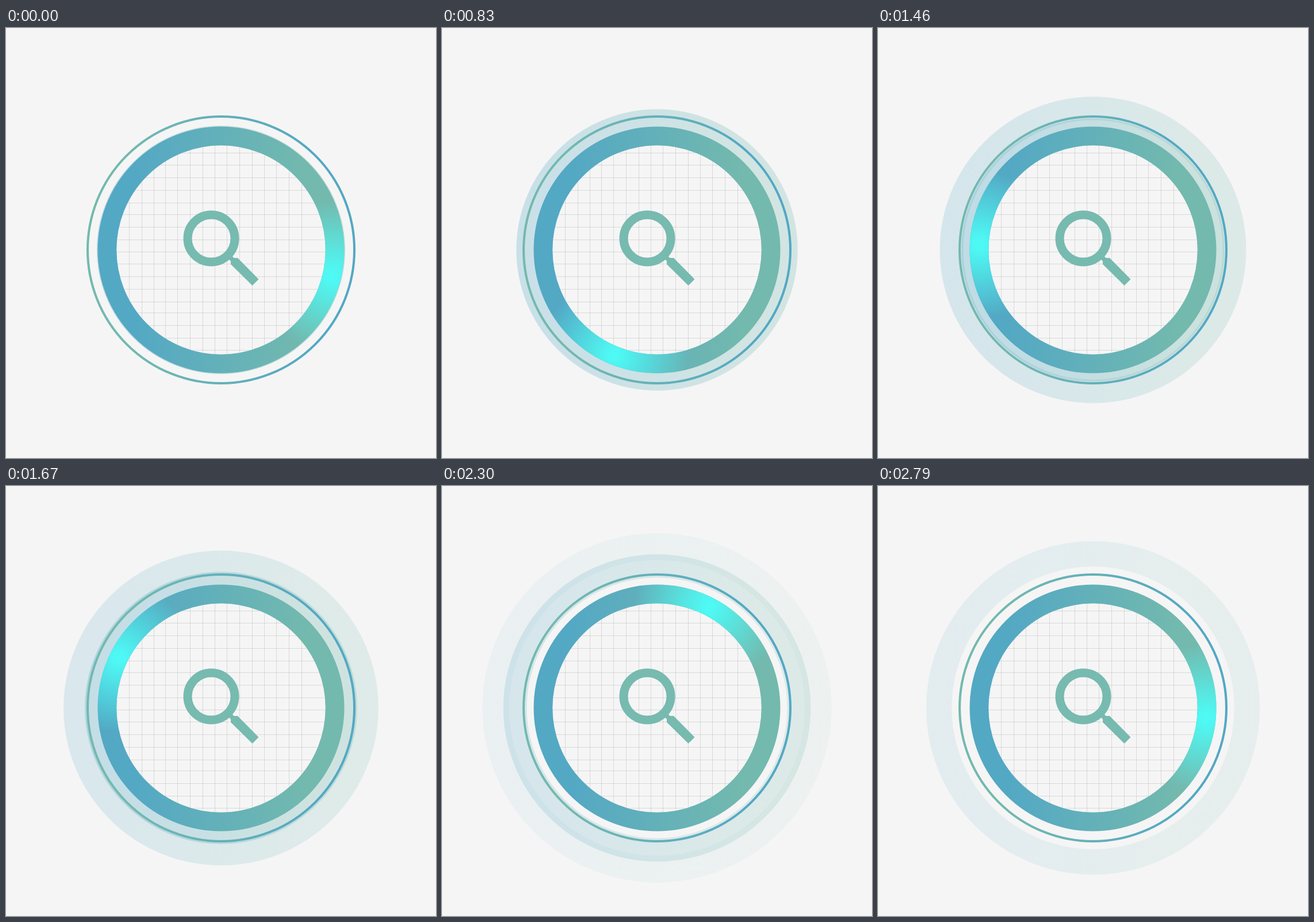
These frames come from a looping animation (748 px wide and 748 px high, 2.86 s). An HTML page with a canvas:

```html
<!DOCTYPE html>
<html lang="en">
<head>
<meta charset="utf-8">
<title>Search radar</title>
<style>
  html, body { margin: 0; width: 100%; height: 100%; overflow: hidden; background: #f5f5f5; }
  canvas { display: block; }
</style>
</head>
<body>
<canvas id="stage" width="748" height="748"></canvas>
<script>
const ctx = document.getElementById('stage').getContext('2d');
const LOOP = 2860;
const CENTER = { x: 374, y: 386 };
const RING = { radius: 198.1, width: 32.8, outer: 214.5, inner: 181.7 };
const BLUE = '#53a8c4', GREEN = '#73b9ae';
const START_ANGLE = 13;

// [time in ms, degrees travelled by the glow]
const SWEEP = [[0, 0], [480, 58], [1180, 140.2], [1460, 169.9], [1950, 224.5],
  [2020, 232.5], [2160, 264], [2300, 284.3], [2650, 335], [2790, 352.2], [LOOP, 360]];

const GRID_X = [214, 236, 257, 277, 298, 320, 342, 363, 384, 406, 428, 449, 470, 492, 514];
const GRID_Y = [217, 238, 260, 282, 304, 324, 346, 368, 389, 410, 432, 454, 476, 495, 517, 539, 560];

const handle = new Path2D('M396 400H403L439.5 437L428.5 448L391 411V404Z');

// The picture advances in 70 ms steps and pauses for one step twice per loop.
function steppedTime(time) {
  const step = time < 60 ? 0 : 60 + Math.floor((time - 60) / 70) * 70;
  return step === 2090 || step === 2720 ? step - 70 : step;
}

function sweepAt(time) {
  const i = SWEEP.findIndex(key => key[0] > time);
  const [t0, a0] = SWEEP[i - 1], [t1, a1] = SWEEP[i];
  return a0 + (a1 - a0) * (time - t0) / (t1 - t0);
}

function horizontalGradient(radius, left, right) {
  const gradient = ctx.createLinearGradient(-radius, 0, radius, 0);
  gradient.addColorStop(0, left);
  gradient.addColorStop(0.15, left);
  gradient.addColorStop(0.85, right);
  gradient.addColorStop(1, right);
  return gradient;
}

function strokeCircle(x, y, radius, width, style) {
  ctx.beginPath();
  ctx.arc(x, y, radius, 0, Math.PI * 2);
  ctx.lineWidth = width;
  ctx.strokeStyle = style;
  ctx.stroke();
}

function drawBaseRing() {
  strokeCircle(0, 0, RING.radius, RING.width, horizontalGradient(RING.outer, BLUE, GREEN));
}

function drawPulse(outer) {
  const end = 322;
  if (outer < RING.outer || outer > end) return;
  const scale = outer / RING.outer;
  ctx.save();
  ctx.globalAlpha = 0.38 * (end - outer) / (end - RING.outer);
  ctx.scale(scale, scale);
  drawBaseRing();
  ctx.restore();
}

function drawGlow(sweep) {
  const angle = (START_ANGLE + sweep) * Math.PI / 180;
  const x = RING.radius * Math.cos(angle), y = RING.radius * Math.sin(angle);
  const glow = ctx.createRadialGradient(x, y, 0, x, y, 130);
  glow.addColorStop(0, 'rgba(78,250,245,1)');
  glow.addColorStop(0.08, 'rgba(78,250,245,.97)');
  glow.addColorStop(1, 'rgba(78,250,245,0)');
  strokeCircle(0, 0, RING.radius, RING.width, glow);
}

function drawGrid() {
  ctx.save();
  ctx.beginPath();
  ctx.arc(CENTER.x, CENTER.y, RING.inner, 0, Math.PI * 2);
  ctx.clip();
  ctx.fillStyle = 'rgba(0,0,0,.11)';
  for (const x of GRID_X) ctx.fillRect(x, 200, 1, 372);
  for (const y of GRID_Y) ctx.fillRect(188, y, 372, 1);
  ctx.restore();
}

function drawMagnifier() {
  const color = '#77baaf';
  strokeCircle(357, 366, 41, 15, color);
  ctx.beginPath();
  ctx.moveTo(386, 395);
  ctx.lineTo(397, 406);
  ctx.lineWidth = 8;
  ctx.stroke();
  ctx.fillStyle = color;
  ctx.fill(handle);
}

function draw(time) {
  const sweep = sweepAt(steppedTime(time));
  ctx.fillStyle = '#f5f5f5';
  ctx.fillRect(0, 0, 748, 748);
  drawGrid();
  drawMagnifier();

  ctx.save();
  ctx.translate(CENTER.x, CENTER.y);
  drawPulse(216 + 0.28 * sweep + 0.0001 * sweep * sweep);
  drawPulse(219 + 0.335 * (sweep - 140));
  strokeCircle(0, 0, 232, 4, horizontalGradient(234, GREEN, BLUE));
  drawBaseRing();
  drawGlow(sweep);
  ctx.restore();
}

const startTime = performance.now();
function tick() {
  draw((performance.now() - startTime) % LOOP);
  requestAnimationFrame(tick);
}
tick();
</script>
</body>
</html>
```
